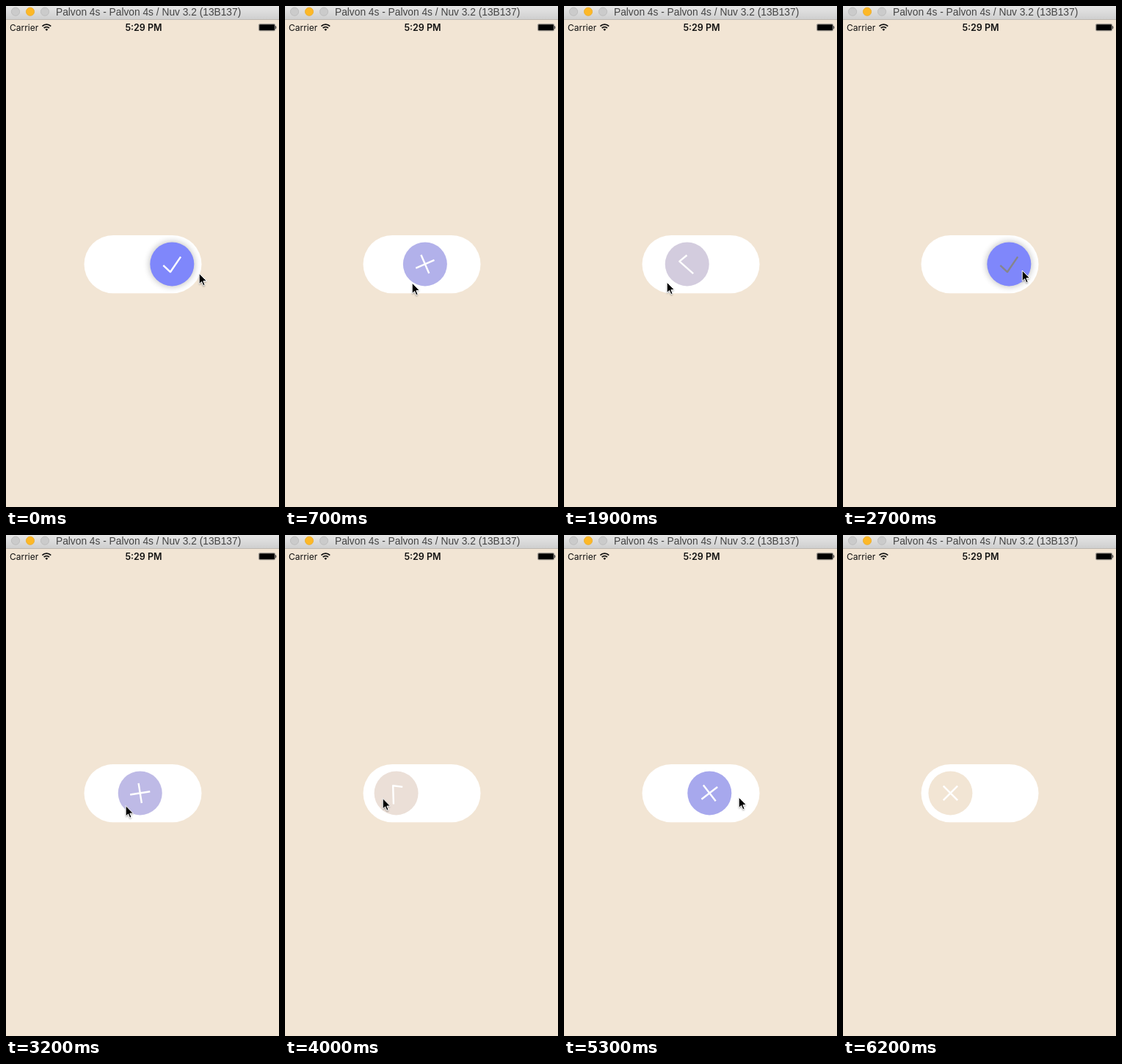
An HTML page for the animation above (6.5 s loop, 372 px wide and 684 px high).

```html
<!DOCTYPE html>
<html lang="en">
<head>
<meta charset="utf-8">
<title>Check switch</title>
<style>
  html, body { margin: 0; width: 100%; height: 100%; overflow: hidden; background: #f2e5d4; }
  svg { display: block; }
  .title { font: 13.75px "Liberation Sans", Arial, sans-serif; fill: #444; }
  .status { font: 12px Inter, sans-serif; fill: #111; }
  .clock { font-size: 12.5px; font-weight: 600; text-anchor: middle; }
</style>
</head>
<body>
<svg width="372" height="684" viewBox="0 0 372 684">
  <defs>
    <linearGradient id="bar" x2="0" y2="1">
      <stop stop-color="#e6e6e6"/><stop offset="1" stop-color="#cfcfcf"/>
    </linearGradient>
    <filter id="blur" x="-50%" y="-50%" width="200%" height="200%"><feGaussianBlur stdDeviation="4"/></filter>
    <filter id="soft" x="-50%" y="-50%" width="200%" height="200%"><feGaussianBlur stdDeviation="1"/></filter>
    <path id="arrow" d="M0 0V14.5L3.4 11.4L5.6 16.7L7.9 15.7L5.7 10.6H10.3Z"/>
  </defs>

  <rect width="372" height="684" fill="#f2e5d4"/>
  <rect width="372" height="18" fill="url(#bar)"/>
  <rect y="18" width="372" height="1" fill="#bdb8b1"/>
  <g fill="#cbcbcb" stroke="#b8b8b8" stroke-width=".8">
    <circle cx="13" cy="7.7" r="5.6"/>
    <circle cx="33" cy="7.7" r="5.6" fill="#fdb827" stroke="#e9ab2c"/>
    <circle cx="53" cy="7.7" r="5.6"/>
  </g>
  <text class="title" x="68" y="12.7">Palvon 4s - Palvon 4s / Nuv 3.2 (13B137)</text>

  <text class="status" x="5" y="33.7">Carrier</text>
  <text class="status clock" x="187.5" y="33.7">5:29 PM</text>
  <g fill="none" stroke="#111" stroke-width="1.8">
    <path d="M49.4 27.6a8.4 8.4 0 0 1 11.8 0M51.7 30.1a5 5 0 0 1 7.2 0"/>
    <path d="M55.3 34l-1.9-2a2.7 2.7 0 0 1 3.8 0z" fill="#111" stroke="none"/>
  </g>
  <rect x="344.4" y="24.6" width="22.4" height="9.2" rx="1.5" fill="none" stroke="#777" stroke-width=".7"/>
  <rect x="345.2" y="25.2" width="20.8" height="8" rx=".8" fill="#000"/>
  <path d="M367.3 27.3q1.6 2 0 4z" fill="#111" stroke="#111" stroke-width=".6"/>

  <rect x="106.5" y="313" width="160" height="79.2" rx="39.6" fill="#fff"/>
  <g id="knob">
    <circle id="glow" r="31" fill="#000" opacity=".24" filter="url(#blur)"/>
    <circle id="disc" r="30"/>
    <path id="mark" fill="none" stroke-width="2.4" stroke-linejoin="round"/>
  </g>
  <g id="cursor">
    <use href="#arrow" y="1.5" opacity=".4" filter="url(#soft)"/>
    <use href="#arrow" stroke="#fff" stroke-width="1"/>
  </g>
</svg>
<script>
const LOOP = 6500, STEP = 100, TURN = 500, PRESS = 170;
const HIDE_CURSOR = 5500;
const toggles = [390, 1670, 2850, 3900, 5030];
const OFF = { x: 146.4, color: [242, 229, 212], mark: 'M-9.7 -9.7L9.7 9.7M9.7 -9.7L-9.7 9.7', spin: -180 };
const ON = { x: 226.3, color: [127, 135, 251], mark: 'M-12 1.8L-2.4 10.8L11.8 -10', spin: 180 };

// time, x, y of the pointer tip
const pointer = [
  [0, 263.2, 365], [250, 236, 368], [390, 232, 369], [600, 187, 378], [700, 173.2, 378],
  [1000, 145, 388], [1450, 140.2, 377], [1900, 140.2, 377], [2100, 286, 400],
  [2500, 244.2, 361], [2850, 244.2, 361], [3300, 140, 372], [3650, 133.2, 359.5],
  [4000, 133.2, 359.5], [4400, 200, 376], [4800, 238.2, 358], [LOOP, 238.2, 358]
];

const el = id => document.getElementById(id);
const knob = el('knob'), glow = el('glow'), disc = el('disc'), mark = el('mark'), cursor = el('cursor');
const mix = (a, b, k) => a + (b - a) * k;

function drawSwitch(t) {
  const done = toggles.filter(start => t >= start).length;
  const [from, to] = done % 2 ? [ON, OFF] : [OFF, ON];
  const turn = done ? Math.min(1, (t - toggles[done - 1]) / TURN) : 1;
  const eased = turn ** 1.7;
  const pressed = t >= toggles[done] - PRESS;

  knob.setAttribute('transform', `translate(${mix(from.x, to.x, eased)} 352.4)`);
  disc.setAttribute('fill', `rgb(${from.color.map((c, i) => Math.round(mix(c, to.color[i], eased)))})`);
  glow.style.display = to === ON && turn === 1 ? '' : 'none';
  mark.setAttribute('d', to.mark);
  mark.setAttribute('transform', `rotate(${to.spin * (1 - turn)})`);
  mark.setAttribute('stroke', pressed ? '#86858a' : '#fff');
}

function drawCursor(t) {
  const next = pointer.findIndex(p => p[0] > t);
  const [t0, x0, y0] = pointer[next - 1], [t1, x1, y1] = pointer[next];
  const k = (t - t0) / (t1 - t0);
  cursor.setAttribute('transform', `translate(${mix(x0, x1, k)} ${mix(y0, y1, k)})`);
  cursor.style.display = t < HIDE_CURSOR ? '' : 'none';
}

function frame() {
  const t = Math.floor(performance.now() % LOOP / STEP) * STEP;
  drawSwitch(t);
  drawCursor(t);
  requestAnimationFrame(frame);
}
frame();
</script>
</body>
</html>
```
